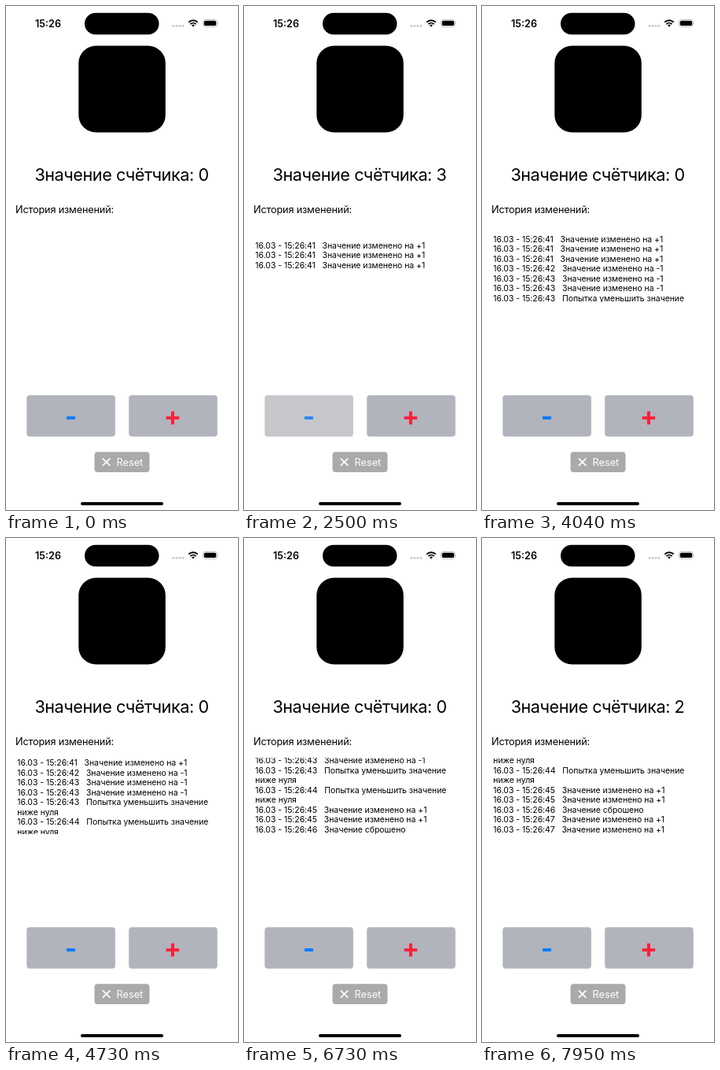
An HTML page that plays this animation: 295x640 px, repeating every 8000 ms.

```html
<!DOCTYPE html>
<html lang="ru">
<head>
<meta charset="utf-8">
<style>
  html, body { margin: 0; width: 100%; height: 100%; overflow: hidden; background: #fff; }
  svg { display: block; width: 295px; height: 640px; font-family: Inter, sans-serif; }
  text { white-space: pre; }
  #title { font-size: 21.7px; letter-spacing: -.47px; text-anchor: middle; }
  #log { font-size: 10.5px; letter-spacing: -.05px; }
  .sign { font-size: 33px; font-weight: 700; text-anchor: middle; }
  .key rect { fill: #b1b3bd; }
  .key.down rect { fill: #c6c7ca; }
  .key.down text { opacity: .8; }
  #reset.down { opacity: .6; }
</style>
</head>
<body>
<svg viewBox="0 0 295 640">
  <clipPath id="view"><rect x="12" y="279" width="271" height="97"/></clipPath>

  <text x="37" y="26.5" font-size="12.6" font-weight="600">15:26</text>
  <rect x="100" y="8.7" width="94.5" height="27.6" rx="13.8"/>
  <g fill="#c4c4c4">
    <circle cx="213" cy="25.3" r="1.4"/><circle cx="217" cy="25.3" r="1.4"/>
    <circle cx="221" cy="25.3" r="1.4"/><circle cx="225" cy="25.3" r="1.4"/>
  </g>
  <g fill="none" stroke="#000" stroke-width="1.8">
    <path d="M232.2 20.6a8.3 8.3 0 0 1 11.6 0M234.4 23a5.2 5.2 0 0 1 7.2 0"/>
    <path d="M238 26.5l-1.9-2a2.8 2.8 0 0 1 3.8 0z" fill="#000" stroke="none"/>
  </g>
  <rect x="250.5" y="17.5" width="18" height="8.8" rx="2.8" fill="none" stroke="#aaa" stroke-width=".8"/>
  <rect x="251.8" y="18.8" width="15.4" height="6.2" rx="1.7"/>
  <path d="M269.6 20.4q1.3 1.5 0 3z" fill="#aaa"/>

  <rect x="92.3" y="50.5" width="110.5" height="110" rx="22"/>

  <text id="title" x="147" y="222"></text>
  <text x="12" y="263" font-size="12.75" letter-spacing="-.2">История изменений:</text>
  <g clip-path="url(#view)"><g id="log"></g></g>

  <g id="minus" class="key">
    <rect x="26.3" y="494.2" width="112.6" height="52.6" rx="4"/>
    <text class="sign" x="82.5" y="532.5" fill="#007aff">-</text>
  </g>
  <g id="plus" class="key">
    <rect x="156.2" y="494.2" width="112.6" height="52.6" rx="4"/>
    <text class="sign" x="212" y="532.5" fill="#ff1f38">+</text>
  </g>
  <g id="reset">
    <rect x="112.5" y="566.3" width="70" height="25.6" rx="4" fill="#aaa"/>
    <path d="M123.3 574.8l8.6 8.6m0-8.6l-8.6 8.6" stroke="#fff" stroke-width="1.7" stroke-linecap="round"/>
    <text x="140.5" y="583.7" font-size="12.75" fill="#fff">Reset</text>
  </g>
  <rect x="95" y="630" width="105" height="4" rx="2"/>
</svg>
<script>
const LOOP = 8000, ROW = 12.5, HOLD = 125, SCROLL = 250;
const $ = id => document.getElementById(id);

// release time, button, hold time
const taps = [
  [1100, 'plus'], [1510, 'plus'], [1930, 'plus'],
  [2620, 'minus'], [2960, 'minus'], [3810, 'minus', 680], [3930, 'minus'], [4500, 'minus'],
  [5220, 'plus'], [5620, 'plus'], [6490, 'reset'], [7350, 'plus'], [7700, 'plus']
];

const rows = [];
function addRow(time, str) {
  const el = document.createElementNS('http://www.w3.org/2000/svg', 'text');
  el.setAttribute('x', 14.3);
  el.setAttribute('y', 307.8 + rows.length * ROW);
  el.textContent = str;
  $('log').append(el);
  rows.push({ time, el });
}

function describe(button, count) {
  if (button === 'reset') return [0, 'Значение сброшено'];
  if (button === 'plus') return [count + 1, 'Значение изменено на +1'];
  if (count > 0) return [count - 1, 'Значение изменено на -1'];
  return [0, 'Попытка уменьшить значение', 'ниже нуля'];
}

// Each state holds the counter and the log offset that a tap leads to.
const states = [{ time: 0, count: 0, scroll: 0 }];
for (const [time, button] of taps) {
  const [count, ...lines] = describe(button, states.at(-1).count);
  const sec = 41 + Math.floor((time - 945) / 1000);
  lines[0] = `16.03 - 15:26:${sec}   ${lines[0]}`;
  lines.forEach(line => addRow(time, line));
  const scroll = Math.max(0, rows.length * ROW - 76 - 2.5 * lines.length);
  states.push({ time, count, scroll });
}

const ease = p => p * p * (3 - 2 * p);

function draw(now) {
  const t = now % LOOP;
  const i = states.findLastIndex(s => s.time <= t);
  const state = states[i], from = states[Math.max(0, i - 1)].scroll;
  const p = ease(Math.min(1, (t - state.time) / SCROLL));

  $('title').textContent = 'Значение счётчика: ' + state.count;
  $('log').setAttribute('transform', `translate(0 ${-from - (state.scroll - from) * p})`);
  for (const { time, el } of rows) el.setAttribute('visibility', time <= t ? 'visible' : 'hidden');
  for (const id of ['plus', 'minus', 'reset']) {
    const held = taps.some(([end, button, hold = HOLD]) => button === id && end - hold <= t && t < end);
    $(id).classList.toggle('down', held);
  }
  requestAnimationFrame(draw);
}
draw(0);
</script>
</body>
</html>
```
